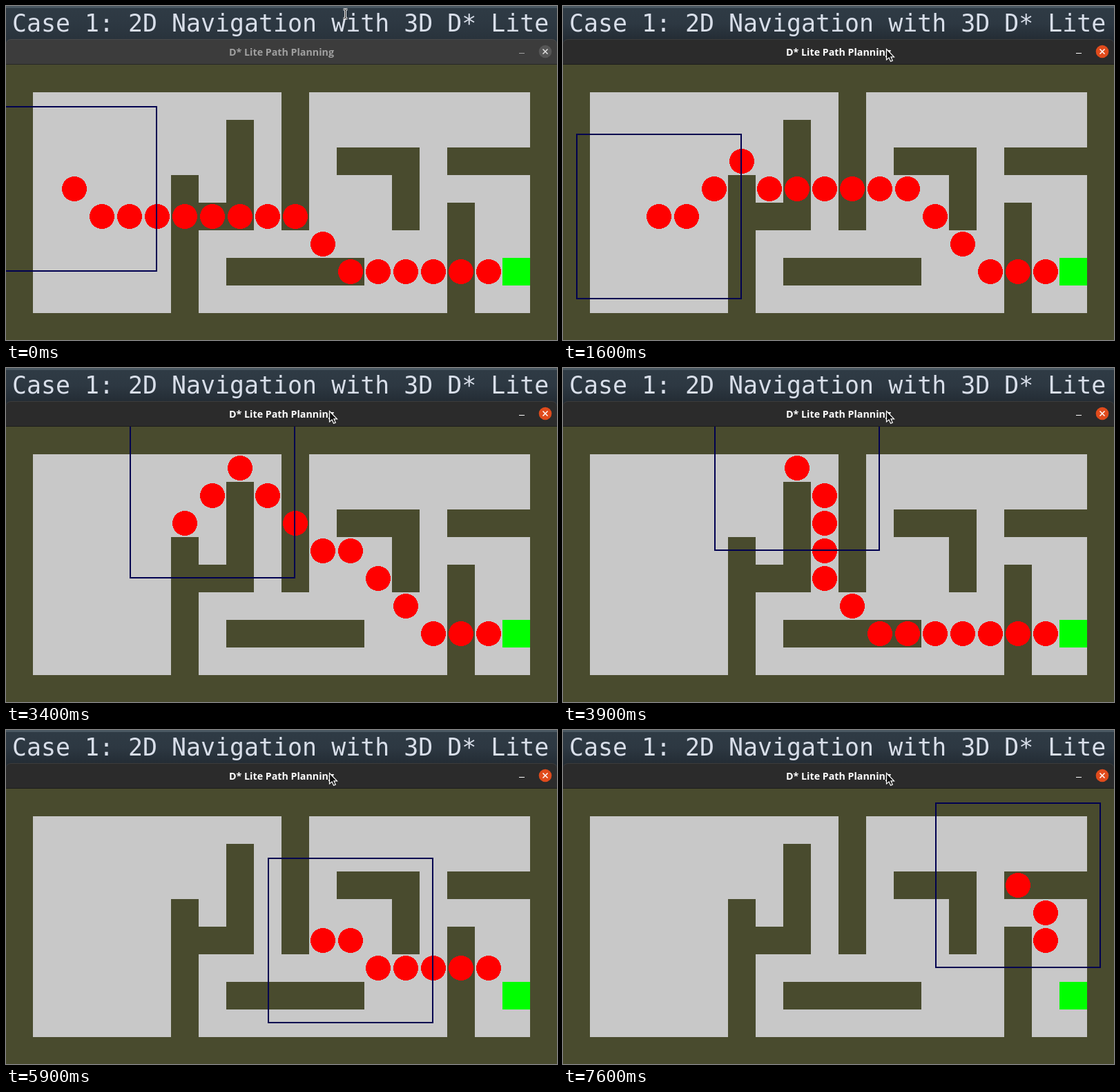
Write an HTML page with a canvas that moves like this. It is 798x484 px and loops after 8000 ms.

```html
<!DOCTYPE html>
<html lang="en">
<head>
<meta charset="utf-8">
<title>Path planning</title>
<style>
  html, body { margin: 0; width: 100%; height: 100%; overflow: hidden; background: #494b2e; }
  canvas { display: block; }
</style>
</head>
<body>
<canvas id="stage" width="798" height="484"></canvas>
<script>
const ctx = document.getElementById('stage').getContext('2d');
const LOOP = 8000, TICK = 100, CELL = 40;
const WALL = '#494b2e', FREE = '#c8c8c8';

// Wall centre lines in cell units, stroked one cell wide
const walls = new Path2D('M6 8V4 M6 5H8V2 M10 1V5 M12 3H14V5 M16 3H18 M16 5V8 M8 7H12');

// Each plan starts where the robot stands and is followed for some moves.
const plans = [
  { follow: 1, route: 'SE E7 SE2 E5' },
  { follow: 2, route: 'E NE2 SE E5 SE3 E2' },
  { follow: 2, route: 'NE3 SE3 E SE3 E2' },
  { follow: 3, route: 'NE SE S3 SE2 E6' },
  { follow: 5, route: 'S SE E2 SE E4' },
  { follow: 5, route: 'E N NE2 SE S' }
];

// Pauses between moves; the drawn path lags behind the sensor window.
const UNIT = 50, LAG = 50;
const pauses = [28, 17, 8, 7, 8, 8, 8, 7, 6, 7, 7, 7, 6, 6, 7, 9, 5];

function trace(route, [col, row]) {
  const path = [[col, row]];
  for (const [, dir, count] of route.matchAll(/([NSEW]+)(\d*)/g)) {
    for (let i = 0; i < (count || 1); i++) {
      col += dir.includes('E') - dir.includes('W');
      row += dir.includes('S') - dir.includes('N');
      path.push([col, row]);
    }
  }
  return path;
}

// The path still ahead of the robot after each move
const ahead = [];
let robot = [2, 4];
for (const { follow, route } of plans) {
  const path = trace(route, robot);
  for (let i = 0; i < follow; i++) ahead.push(path.slice(i));
  robot = path[follow];
}

function pathAt(t) {
  let step = 0, due = pauses[0] * UNIT;
  while (step < pauses.length && due <= t) due += pauses[++step] * UNIT;
  return ahead[step];
}

const mix = (a, b, k) => a + (b - a) * k;
const blend = (a, b, k) => `rgb(${a.map((v, i) => Math.round(mix(v, b[i], k)))})`;
const gray = (a, b, k) => blend([a, a, a], [b, b, b], k);
const centre = ([col, row]) => [col * CELL + 19, row * CELL + 105];

function rect(color, x, y, w, h) {
  ctx.fillStyle = color;
  ctx.fillRect(x, y, w, h);
}

// Hard-edged disc made of pixel rows
function disc(cell) {
  const [x, y] = centre(cell), r = 18;
  for (let dy = -r; dy < r; dy++) {
    const half = Math.round(Math.sqrt(r * r - (dy + 0.5) ** 2));
    rect('#ff0000', x - half, y + dy, half * 2, 1);
  }
}

function drawMaze(t) {
  rect(WALL, 0, 84, 798, 400);
  rect(FREE, 39, 125, 18 * CELL, 8 * CELL);

  ctx.save();
  ctx.translate(...centre([0, 0]));
  ctx.scale(CELL, CELL);
  ctx.strokeStyle = WALL;
  ctx.lineWidth = 1;
  ctx.lineCap = 'square';
  ctx.stroke(walls);
  ctx.restore();

  const [goalX, goalY] = centre([18, 7]);
  rect('#00ff00', goalX - CELL / 2, goalY - CELL / 2, CELL, CELL);
  pathAt(t - LAG).forEach(disc);

  const [x, y] = centre(pathAt(t)[0]), reach = 119;
  ctx.strokeStyle = '#000050';
  ctx.lineWidth = 2;
  ctx.strokeRect(x - reach, y - reach, reach * 2, reach * 2);
}

function drawHeader(focus) {
  const bg = ctx.createLinearGradient(0, 3, 0, 48);
  bg.addColorStop(0, '#2f3b45');
  bg.addColorStop(0.5, '#2d3842');
  bg.addColorStop(1, blend([41, 51, 60], [36, 45, 53], focus));
  rect(bg, 0, 0, 798, 56);
  rect('#4a5862', 0, 0, 798, 3);
  ctx.fillStyle = '#d8dee9';
  ctx.textAlign = 'left';
  ctx.font = '34.9px "DejaVu Sans Mono", monospace';
  ctx.fillText('Case 1: 2D Navigation with 3D D* Lite', 9, 37);
}

function drawBar(color, y) {
  ctx.fillStyle = color;
  ctx.beginPath();
  ctx.roundRect(0, y, 798, 85 - y, [7, 7, 0, 0]);
  ctx.fill();
}

function drawTitleBar(focus) {
  drawBar(gray(74, 60, focus), 48);
  drawBar(gray(60, 43, focus), 49);
  rect(gray(38, 28, focus), 0, 84, 798, 1);

  const ink = gray(160, 255, focus);
  ctx.fillStyle = ink;
  ctx.textAlign = 'center';
  ctx.font = 'bold 14.25px "Open Sans", sans-serif';
  ctx.fillText('D* Lite Path Planning', 399, 72);
  rect(ink, 743, 68, 8, 1);

  ctx.fillStyle = blend([86, 86, 86], [224, 75, 28], focus);
  ctx.beginPath();
  ctx.arc(781, 66, 9.3, 0, Math.PI * 2);
  ctx.fill();
  ctx.strokeStyle = gray(225, 255, focus);
  ctx.lineWidth = 1.5;
  ctx.stroke(new Path2D('M777.5 62.5l7 7m0 -7l-7 7'));
}

function drawBeam() {
  const stem = new Path2D('M-3 -6.5H-1L0 -5.5L1 -6.5H3M0 -5.5V5.5M-3 6.5H-1L0 5.5L1 6.5H3');
  for (const [color, width] of [['#ffffff', 3], ['#111111', 1]]) {
    ctx.strokeStyle = color;
    ctx.lineWidth = width;
    ctx.stroke(stem);
  }
}

function drawArrow() {
  const arrow = new Path2D('M0 0V15.5L3.6 12.4L6 17.8L8.8 16.6L6.4 11.3H11Z');
  ctx.fillStyle = '#111111';
  ctx.fill(arrow);
  ctx.strokeStyle = '#ffffff';
  ctx.lineWidth = 1.2;
  ctx.stroke(arrow);
}

function drawCursor(t) {
  const k = Math.min(t / 600, 1);
  const ease = k * k * (3 - 2 * k);
  const x = mix(491, 468, ease), y = mix(12, 62.5, ease);
  ctx.save();
  ctx.translate(Math.round(x) + 0.5, Math.round(y) - 0.5);
  if (y < 48) drawBeam(); else drawArrow();
  ctx.restore();
}

function draw(t) {
  const focus = Math.min(Math.max((t - 700) / 200, 0), 1);
  drawMaze(t);
  drawHeader(focus);
  drawTitleBar(focus);
  drawCursor(t);
}

const begin = performance.now();
function frame() {
  const t = (performance.now() - begin) % LOOP;
  draw(Math.floor(t / TICK) * TICK);
  requestAnimationFrame(frame);
}
frame();
</script>
</body>
</html>
```
